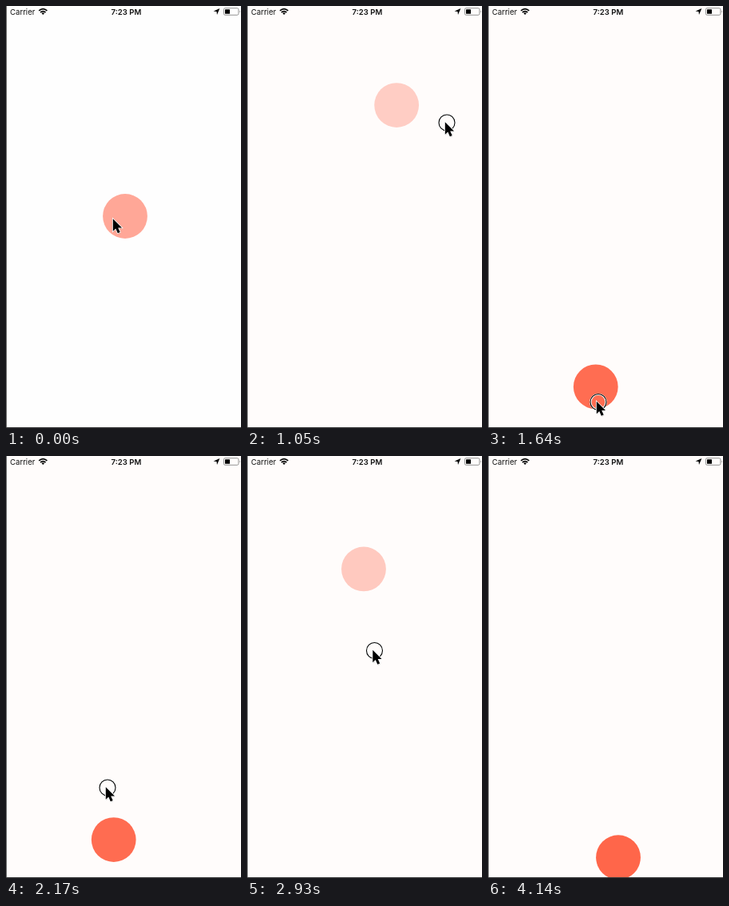
An HTML page that plays this animation: 294 by 528 pixels, repeating every 4.24 s.

```html
<!DOCTYPE html>
<html lang="en">
<head>
<meta charset="utf-8">
<title>Springy ball</title>
<style>
  html, body { margin: 0; width: 100%; height: 100%; overflow: hidden; background: #fefefe; }
  svg { display: block; width: 294px; height: 528px; }
  text { font-family: Inter, Roboto, sans-serif; font-size: 9.6px; fill: #111; }
</style>
</head>
<body>
<svg viewBox="0 0 294 528" xmlns="http://www.w3.org/2000/svg">
  <rect id="back" width="294" height="528" fill="#fefefe"/>
  <circle id="ball" r="27.9"/>
  <g id="touch" fill="none">
    <circle r="9.6" stroke="#fff" stroke-width="2.4"/>
    <circle r="10" stroke="#000" stroke-width="1.1"/>
  </g>
  <g id="cursor">
    <path d="M0 0V15.4L3.5 12.2L6 18L8.9 16.8L6.4 11.1H11.2Z" transform="translate(.6 1.2)" opacity=".18"/>
    <path d="M0 0V15.4L3.5 12.2L6 18L8.9 16.8L6.4 11.1H11.2Z" stroke="#fff" stroke-width="1.6" paint-order="stroke"/>
  </g>

  <g id="status">
    <text x="5" y="10.5">Carrier</text>
    <text x="150.4" y="10.5" text-anchor="middle" font-weight="600">7:23 PM</text>
    <g fill="none" stroke="#000" stroke-width="1.7">
      <path d="M41.2 5.9Q46.3 1.2 51.4 5.9"/>
      <path d="M43.1 8Q46.3 5.1 49.5 8"/>
    </g>
    <path d="M44.5 9.1Q46.3 7.6 48.1 9.1L46.3 11Z"/>
    <path d="M267.4 3L264 11L263.5 7L259.6 6.5Z"/>
    <rect x="272.5" y="2.7" width="18.4" height="8.6" rx="1.6" fill="none" stroke="#888" stroke-width=".9"/>
    <rect x="274" y="4.2" width="6" height="5.6" rx=".5"/>
    <path d="M292 5.4Q293.6 7 292 8.6Z" fill="#888"/>
  </g>
  <path d="M.5 0V528" stroke="#666"/>
  <path d="M0 527.5H294" stroke="#3a3a3a"/>
</svg>
<script>
const LOOP = 4240, TICK = 58.6, TICKS = Math.ceil(LOOP / TICK) + 1;
const TINT = 8, PRESS = 10, RELEASE = 55, LEAVE = 59;
const STIFFNESS = 400, DAMPING = 28, SUBSTEPS = 16;

// Turning points of the finger: [tick, x, y].
const stroke = [
  // approach
  [0, 136, 267], [5, 150, 283], [10, 150, 283],
  // up, over and down
  [12, 132, 186], [13, 129.5, 180], [14, 120, 140], [15, 126, 124], [17, 190, 121],
  [18, 250, 146], [20, 210, 250], [22, 189.5, 315.5], [26, 133, 462], [28, 138, 495.5],
  // up again
  [35.9, 136.5, 495.5], [37, 127, 415], [39, 122, 205], [40, 131, 136], [42, 134.5, 118.5],
  [45, 133, 50], [47.6, 133, 44],
  // down and away
  [50, 159.5, 243.5], [52, 168, 440], [54, 163, 502.2], [55, 163, 502.2],
  [57, 163.5, 515], [58, 181, 526]
];

const el = id => document.getElementById(id);
const back = el("back"), ball = el("ball"), touch = el("touch"), cursor = el("cursor");

function fingerAt(k) {
  const next = stroke.findIndex(point => point[0] > k);
  if (next < 0) return stroke[stroke.length - 1].slice(1);
  const [k0, x0, y0] = stroke[next - 1], [k1, x1, y1] = stroke[next];
  const u = (k - k0) / (k1 - k0);
  return [x0 + (x1 - x0) * u, y0 + (y1 - y0) * u];
}

// The ball is pulled to the finger by a damped spring; one position per tick.
function springPath() {
  const pos = [149, 263], speed = [0, 0], path = [];
  const dt = TICK / 1000 / SUBSTEPS;
  for (let k = 0; k < TICKS; k++) {
    path.push([...pos]);
    if (k < PRESS) continue;
    for (let s = 0; s < SUBSTEPS; s++) {
      const goal = fingerAt(Math.min(k + (s + 0.5) / SUBSTEPS, RELEASE));
      for (const axis of [0, 1]) {
        speed[axis] += (STIFFNESS * (goal[axis] - pos[axis]) - DAMPING * speed[axis]) * dt;
        pos[axis] += speed[axis] * dt;
      }
    }
  }
  return path;
}
const path = springPath();

// The ball deepens from pale pink to tomato as it sinks.
function shade(y) {
  const t = Math.min(1, 0.1 + 0.00176 * y);
  const mix = end => Math.round(255 + (end - 255) * t);
  return `rgb(255,${mix(99)},${mix(71)})`;
}

function place(node, x, y) {
  node.setAttribute("transform", `translate(${x} ${y})`);
}

function show(node, on) {
  node.setAttribute("visibility", on ? "visible" : "hidden");
}

function draw(ms) {
  const k = Math.floor((ms % LOOP + 10) / TICK);
  const [fx, fy] = fingerAt(k), [bx, by] = path[k];
  back.setAttribute("fill", k < TINT ? "#fefefe" : "#fffcfb");
  place(ball, bx, by);
  ball.setAttribute("fill", shade(by));
  place(touch, fx, fy);
  show(touch, k > PRESS && k <= RELEASE);
  place(cursor, fx - 2.2, fy - 0.7);
  show(cursor, k < LEAVE);
}

const start = performance.now();
function tick() {
  draw(performance.now() - start);
  requestAnimationFrame(tick);
}
tick();
</script>
</body>
</html>
```
